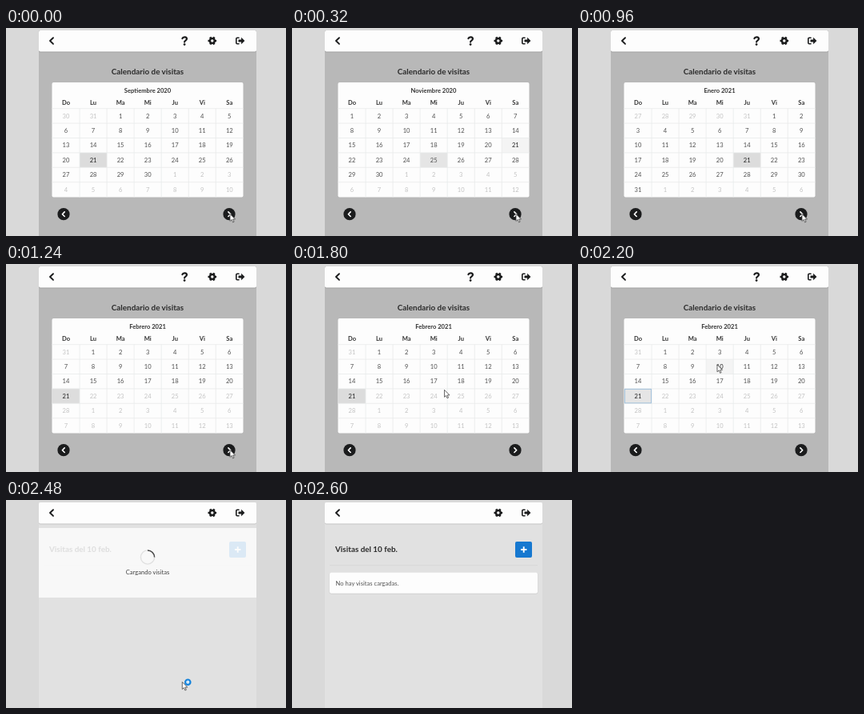
These frames come from a looping animation (350x260 px, 3840 ms). An HTML page:

```html
<!DOCTYPE html>
<html lang="es">
<head>
<meta charset="utf-8">
<title>Calendario de visitas</title>
<style>
  html, body { margin: 0; width: 100%; height: 100%; overflow: hidden; background: #d9d9d9; }
  svg { display: block; width: 350px; height: 260px; font: 7.6px Lato, sans-serif; }
  text { fill: #333; }
  .mid { text-anchor: middle; }
  .bold { font-weight: 700; }
  .title { font-size: 9.9px; font-weight: 700; fill: #2b2b2b; }
  .day { fill: #505050; }
  .day.off { fill: #c3c3c3; }
  .day.on { fill: #222; }
  .line { fill: none; stroke: #1b1c1d; stroke-width: 1.9; stroke-linecap: round; stroke-linejoin: round; }
  .white { stroke: #fff; }
  .grid { stroke: #e9ebeb; stroke-width: .8; }
</style>
</head>
<body>
<svg viewBox="0 0 350 260">
  <rect width="350" height="260" fill="#d9d9d9"/>
  <rect id="column" x="41" y="3" width="272" height="257"/>

  <rect x="41" y="4" width="272" height="26.6" rx="2" fill="#000" opacity=".13"/>
  <rect x="41" y="3" width="272" height="26.5" rx="2" fill="#fdfdfd"/>
  <path class="line" d="M59 12.2 55 16l4 3.9"/>
  <g id="help">
    <path class="line" stroke-linecap="butt" style="stroke-width:2.2" d="M220.4 13.2C221.2 10.8 226 10.8 226 13.6 226 15.6 223.1 15.7 223.1 17.6"/>
    <circle cx="223.1" cy="20.6" r="1.4" fill="#1b1c1d"/>
  </g>
  <g fill="none" stroke="#1b1c1d">
    <circle cx="257.8" cy="16" r="3" stroke-width="2.6"/>
    <circle cx="257.8" cy="16" r="4.5" stroke-width="1.7" pathLength="12" stroke-dasharray="1 1" stroke-dashoffset=".5"/>
  </g>
  <path class="line" style="stroke-width:1.6" d="M291 12.2h-2q-1.2 0-1.2 1.2v5.2q0 1.2 1.2 1.2h2"/>
  <path fill="#1b1c1d" d="M290.5 14.5h3.6v-2.8l4.3 4.3-4.3 4.3v-2.8h-3.6z"/>

  <g id="calendar">
    <text class="title mid" x="177" y="57.6">Calendario de visitas</text>
    <rect x="57.5" y="68" width="239" height="143.5" rx="2" fill="#fdfdfd"/>
    <text id="month" class="mid bold" x="177" y="80.7"></text>
    <rect id="oldMark" fill="#dcdcdc"/>
    <rect id="newMark" fill="#dcdcdc"/>
    <g id="cells"></g>
    <rect id="focus" fill="none" stroke="#a3c3dd"/>
    <circle cx="72" cy="232.7" r="7.6" fill="#1b1c1d"/>
    <path class="line white" style="stroke-width:1.6" d="M73.2 229.9l-2.8 2.8 2.8 2.8"/>
    <circle cx="279" cy="232.7" r="7.6" fill="#1b1c1d"/>
    <path class="line white" style="stroke-width:1.6" d="M277.9 229.9l2.8 2.8-2.8 2.8"/>
  </g>

  <g id="visits">
    <path d="M47 81.7H307" stroke="#d5d5d5" stroke-width=".8"/>
    <text class="title" x="54" y="64.8">Visitas del 10 feb.</text>
    <rect x="279" y="52" width="21" height="20" rx="2" fill="#1678d0"/>
    <path d="M286 62h7.4M289.7 58.3v7.4" stroke="#fff" stroke-width="1.9"/>
    <g id="message">
      <rect x="46.7" y="91" width="260.6" height="26.6" rx="2" fill="#ccc"/>
      <rect x="47" y="90.7" width="260" height="26" rx="2" fill="#fdfdfd"/>
      <text x="54.6" y="106.6" style="fill:#555">No hay visitas cargadas.</text>
    </g>
    <g id="loading">
      <rect x="41" y="35" width="272" height="87" fill="#fcfcfc" opacity=".86"/>
      <circle cx="177" cy="71.5" r="8.6" fill="none" stroke="#e0e0e0" stroke-width="1.4"/>
      <path id="spinner" d="M177 62.9a8.6 8.6 0 0 1 8.6 8.6" fill="none" stroke="#444" stroke-width="1.5"/>
      <text class="mid" x="177" y="93" style="fill:#444">Cargando visitas</text>
    </g>
  </g>

  <g id="cursor">
    <path d="M0 0v9l2.1-1.9 1.5 3.4 1.5-.7-1.5-3.2h2.9z" fill="#fff" stroke="#444" stroke-width=".8" stroke-linejoin="round"/>
    <circle id="busy" cx="7" cy=".2" r="3.2" fill="#d3eafa" stroke="#1583dc" stroke-width="2.2"/>
  </g>
</svg>
<script>
const LOOP = 3840, STEP = 40;
const LEFT = 58, TOP = 100.7, COL = 34.05, ROW = 18.4;
const MONTHS = ['Septiembre 2020', 'Octubre 2020', 'Noviembre 2020', 'Diciembre 2020', 'Enero 2021', 'Febrero 2021'];
// start of each following month and how far its highlight fade has already run
const TURNS = [[80, 30], [320, 30], [640, 60], [920, 60], [1240, 95]];
const PICK = 2200, LOAD = 2480, READY = 2600;
const LAST_DAY = Date.UTC(2021, 1, 21);

const $ = id => document.getElementById(id);
const clamp = v => Math.min(1, Math.max(0, v));
const mix = (a, b, p) => a + (b - a) * p;
const smooth = p => p * p * (3 - 2 * p);
const show = (id, on) => $(id).style.display = on ? '' : 'none';

function add(tag, attrs, text = '') {
  const node = document.createElementNS('http://www.w3.org/2000/svg', tag);
  for (const key in attrs) node.setAttribute(key, attrs[key]);
  node.textContent = text;
  return $('cells').appendChild(node);
}

function place(id, index, opacity, inset = 0) {
  const box = { x: LEFT + index % 7 * COL + inset, y: TOP + Math.floor(index / 7) * ROW + inset,
    width: COL - 2 * inset, height: ROW - 2 * inset, opacity };
  for (const key in box) $(id).setAttribute(key, box[key]);
}

for (let r = 0; r < 6; r++) add('path', { class: 'grid', d: `M57.5 ${TOP + r * ROW}h239` });
for (let c = 1; c < 7; c++) add('path', { class: 'grid', d: `M${LEFT + c * COL} ${TOP}V211.5` });
const centre = c => LEFT + (c + .5) * COL;
['Do', 'Lu', 'Ma', 'Mi', 'Ju', 'Vi', 'Sa'].forEach((name, c) =>
  add('text', { class: 'mid bold', x: centre(c), y: 95.6 }, name));
const days = Array.from({ length: 42 }, (_, i) =>
  add('text', { x: centre(i % 7), y: TOP + (Math.floor(i / 7) + .5) * ROW + 2.7 }));

const lead = m => new Date(Date.UTC(2020, 8 + m, 1)).getUTCDay();
const cellOf = (m, day) => lead(m) + day - 1;

function drawCalendar(t) {
  const m = TURNS.filter(([start]) => t >= start).length;
  const picked = t >= PICK;
  const today = cellOf(m, 21);
  const chosen = picked ? cellOf(m, 10) : today;
  $('month').textContent = MONTHS[m];
  days.forEach((node, i) => {
    const date = new Date(Date.UTC(2020, 8 + m, 1 + i - lead(m)));
    const off = date.getUTCMonth() !== (8 + m) % 12 || date > LAST_DAY;
    node.textContent = date.getUTCDate();
    node.setAttribute('class', 'mid day' + (off ? ' off' : i === chosen || i === today ? ' on' : ''));
  });
  const [start, done] = picked ? [PICK, 30] : TURNS[m - 1] || [-100, 0];
  const fade = clamp((t - start + done) / 100);
  const previous = picked ? today : cellOf(Math.max(0, m - 1), 21);
  place('oldMark', previous, 1 - fade);
  place('newMark', chosen, fade);
  place('focus', today, picked ? 1 : 0, .5);
}

function drawCursor(t) {
  const up = smooth(clamp((t - 1800) / 200));
  const down = smooth(clamp((t - PICK) / 220));
  let x = mix(mix(190.5, 174, up), 220.3, down);
  let y = mix(mix(157.3, 125.8, up), 227.5, down);
  if (t < 1440) [x, y] = [280, 232.4];
  show('cursor', t < 1440 || t >= 1800 && t < READY);
  show('busy', t >= 2400);
  $('cursor').setAttribute('transform', `translate(${x} ${y})`);
}

function frame(now) {
  const t = Math.floor(now % LOOP / STEP) * STEP;
  const calendar = t < LOAD;
  $('column').setAttribute('fill', calendar ? '#b8b8b8' : '#e1e1e1');
  show('help', calendar);
  show('calendar', calendar);
  show('visits', !calendar);
  show('loading', t < READY);
  show('message', t >= READY);
  if (calendar) drawCalendar(t);
  $('spinner').setAttribute('transform', `rotate(${(t - LOAD) * .6} 177 71.5)`);
  drawCursor(t);
}

const origin = performance.now();
function tick() {
  frame(performance.now() - origin);
  requestAnimationFrame(tick);
}
tick();
</script>
</body>
</html>
```
